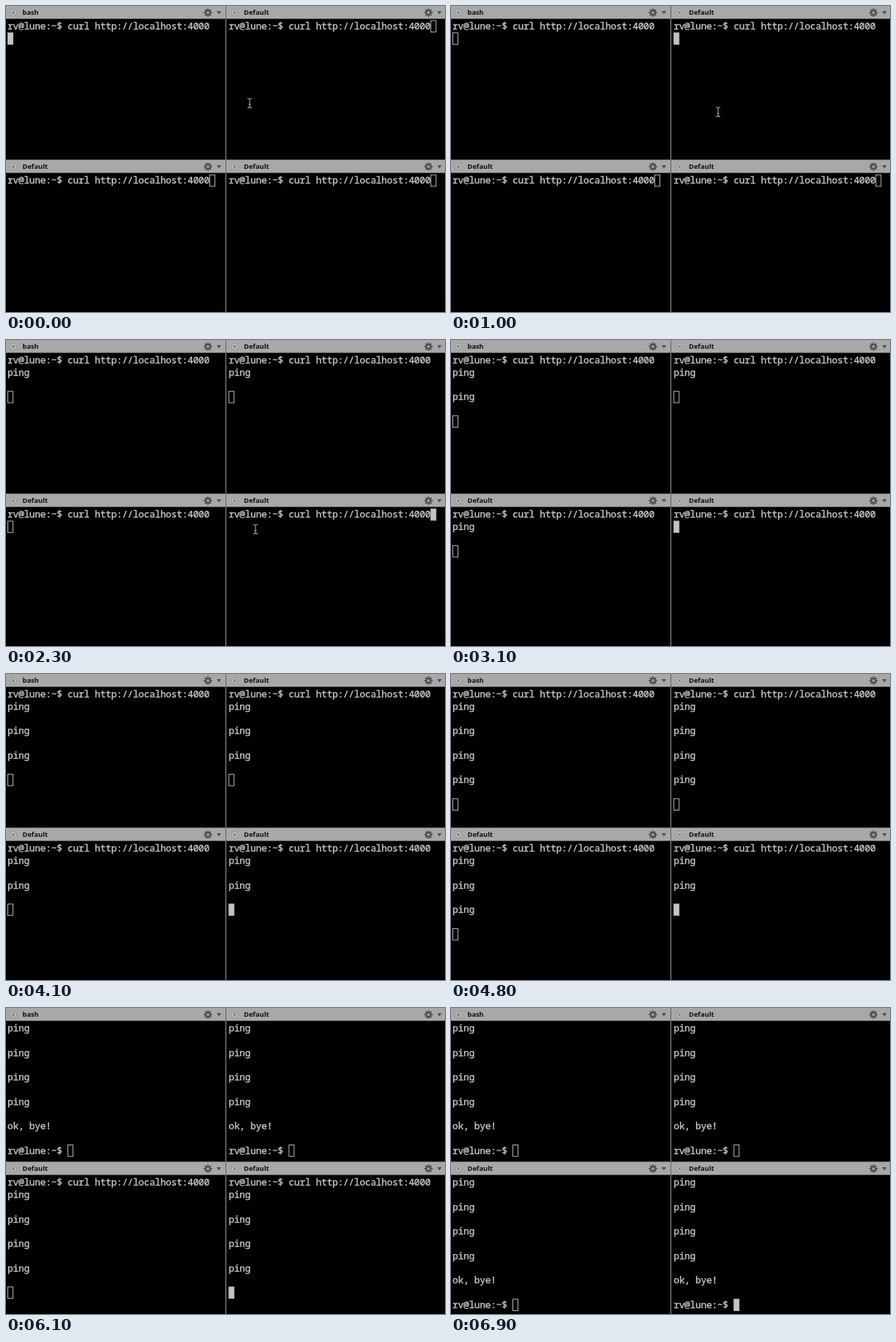
Recreate the animation shown at these times as an HTML page. Size 600 by 419 pixels, loop 7000 ms.

```html
<!DOCTYPE html>
<html lang="en">
<head>
<meta charset="utf-8">
<title>Four terminals</title>
<style>
  html, body { margin: 0; width: 100%; height: 100%; overflow: hidden; background: #000; }
  svg { display: block; width: 600px; height: 419px; }
  text { white-space: pre; }
  .line {
    font: 500 13px "Noto Sans Mono", "DejaVu Sans Mono", monospace;
    letter-spacing: -0.34px; fill: #c8c8c8; stroke: #c8c8c8; stroke-width: 0.35px;
  }
  .title { font: 700 9.3px "Open Sans", "Noto Sans", sans-serif; fill: #111; }
</style>
</head>
<body>
<svg id="stage" viewBox="0 0 600 419"></svg>
<script>
const LOOP = 7000, STEP = 100;
const CELL = 7.46, ROW = 16.75, ROWS = 11;
const TEXT_TOP = 19.4, PANE_X = 302.2, PANE_Y = 211.2;
const PROMPT = "rv@lune:~$ ";
const COMMAND = PROMPT + "curl http://localhost:4000";
const stage = document.getElementById("stage");

// enter, pings and bye are times in ms
const panes = [
  { col: 0, row: 0, title: "bash", focus: [0, 300], enter: 0, pings: [1800, 2900, 3700, 4500], bye: 5500 },
  { col: 1, row: 0, title: "Default", focus: [300, 1300], enter: 800, pings: [2100, 3200, 3800, 4800], bye: 5800 },
  { col: 0, row: 1, title: "Default", focus: [1300, 2200], enter: 1600, pings: [2700, 3500, 4300, 5300], bye: 6300 },
  { col: 1, row: 1, title: "Default", focus: [2200, LOOP], enter: 2600, pings: [3400, 4100, 5100, 6100], bye: 6800 },
];

// pointer path: time, x, y
const pointerPath = [
  [0, 333, 133], [400, 365, 145], [1000, 365, 145], [1300, 110, 266],
  [1600, 110, 266], [2100, 341, 259], [2600, 341, 259],
];
const POINTER_HIDES = 2700;

function add(parent, tag, attrs = {}, content = "") {
  const node = document.createElementNS("http://www.w3.org/2000/svg", tag);
  for (const key in attrs) node.setAttribute(key, attrs[key]);
  node.textContent = content;
  parent.appendChild(node);
  return node;
}

function drawBar(pane) {
  const left = pane.col * 300, shift = pane.col * 302.5, tools = pane.col * 301.4;
  const bar = add(stage, "g", { transform: `translate(0 ${pane.row * 211})` });
  add(bar, "rect", { x: left, y: -1, width: 300, height: 19, fill: "#5c5c5c" });
  add(bar, "rect", { x: left, y: 0, width: 300, height: 17, fill: "#a8a8a8" });
  add(bar, "circle", { cx: shift + 10, cy: 9, r: 4.5, fill: "#bcbcbc", stroke: "#8a8a8a", "stroke-width": 0.8 });
  add(bar, "path", { d: `M${shift + 8.2} 7.2l3.6 3.6m0-3.6l-3.6 3.6`, stroke: "#707070", "stroke-width": 1.1 });
  add(bar, "text", { x: shift + 22.5, y: 12.3, class: "title" }, pane.title);

  const gear = add(bar, "g", { transform: `translate(${tools + 276} 9)`, fill: "none", stroke: "#4f4f4f" });
  add(gear, "circle", { r: 3, "stroke-width": 2.4 });
  for (let a = 0; a < 360; a += 45) {
    add(gear, "path", { d: "M0-3.6V-5.8", "stroke-width": 1.8, transform: `rotate(${a})` });
  }
  add(bar, "path", { d: `M${tools + 288} 7h6l-3 4.6z`, fill: "#4f4f4f" });
}

function setupPane(pane) {
  const body = add(stage, "g", {
    transform: `translate(${2 + pane.col * PANE_X} ${TEXT_TOP + pane.row * PANE_Y})`,
  });
  pane.lines = Array.from({ length: ROWS }, (_, i) =>
    add(body, "text", { x: 0, y: i * ROW + 12.7, class: "line" }));
  pane.cursor = add(body, "rect", { stroke: "#b6b6b6", "stroke-width": 1, width: 7, height: 15.7 });
  drawBar(pane);
}

function paneLines(pane, t) {
  const lines = [COMMAND];
  if (t >= pane.enter) lines.push("");
  for (const time of pane.pings) {
    if (t >= time) lines.splice(-1, 1, "ping", "", "");
  }
  if (t >= pane.bye) lines.splice(-1, 1, "ok, bye!", "", PROMPT);
  return lines.slice(-ROWS);
}

function drawPane(pane, t) {
  const lines = paneLines(pane, t);
  const focused = t >= pane.focus[0] && t < pane.focus[1];
  pane.lines.forEach((node, i) => { node.textContent = lines[i] || ""; });
  pane.cursor.setAttribute("x", lines.at(-1).length * CELL + 0.5);
  pane.cursor.setAttribute("y", (lines.length - 1) * ROW + 0.6);
  pane.cursor.setAttribute("fill", focused ? "#c4c4c4" : "none");
}

function pointerAt(t) {
  const next = pointerPath.findIndex(p => p[0] > t);
  if (next < 0) return pointerPath.at(-1).slice(1);
  const [t0, x0, y0] = pointerPath[next - 1], [t1, x1, y1] = pointerPath[next];
  const u = (t - t0) / (t1 - t0), k = u * u * (3 - 2 * u);
  return [x0 + (x1 - x0) * k, y0 + (y1 - y0) * k];
}

add(stage, "rect", { width: 600, height: 419, fill: "#000" });
panes.forEach(setupPane);
add(stage, "path", { d: "M300.5 18V210M300.5 229V419", stroke: "#9a9a9a" });
add(stage, "path", { d: "M300.5 0V18M300.5 210V229", stroke: "#606060" });
const pointer = add(stage, "path", {
  d: "M-3-6.5Q0-6.5 0-4.5Q0-6.5 3-6.5M0-5V5M-3 6.5Q0 6.5 0 4.5Q0 6.5 3 6.5M-1.5 2H1.5",
  fill: "none", stroke: "#aaa", "stroke-width": 1.1,
});

function render(t) {
  panes.forEach(pane => drawPane(pane, t));
  pointer.setAttribute("transform", `translate(${pointerAt(t).join(" ")})`);
  pointer.setAttribute("visibility", t < POINTER_HIDES ? "visible" : "hidden");
}

let start;
function frame(now) {
  start ??= now;
  const t = Math.max(0, now - start) % LOOP;
  render(Math.floor(t / STEP) * STEP);
  requestAnimationFrame(frame);
}
render(0);
requestAnimationFrame(frame);
</script>
</body>
</html>
```
